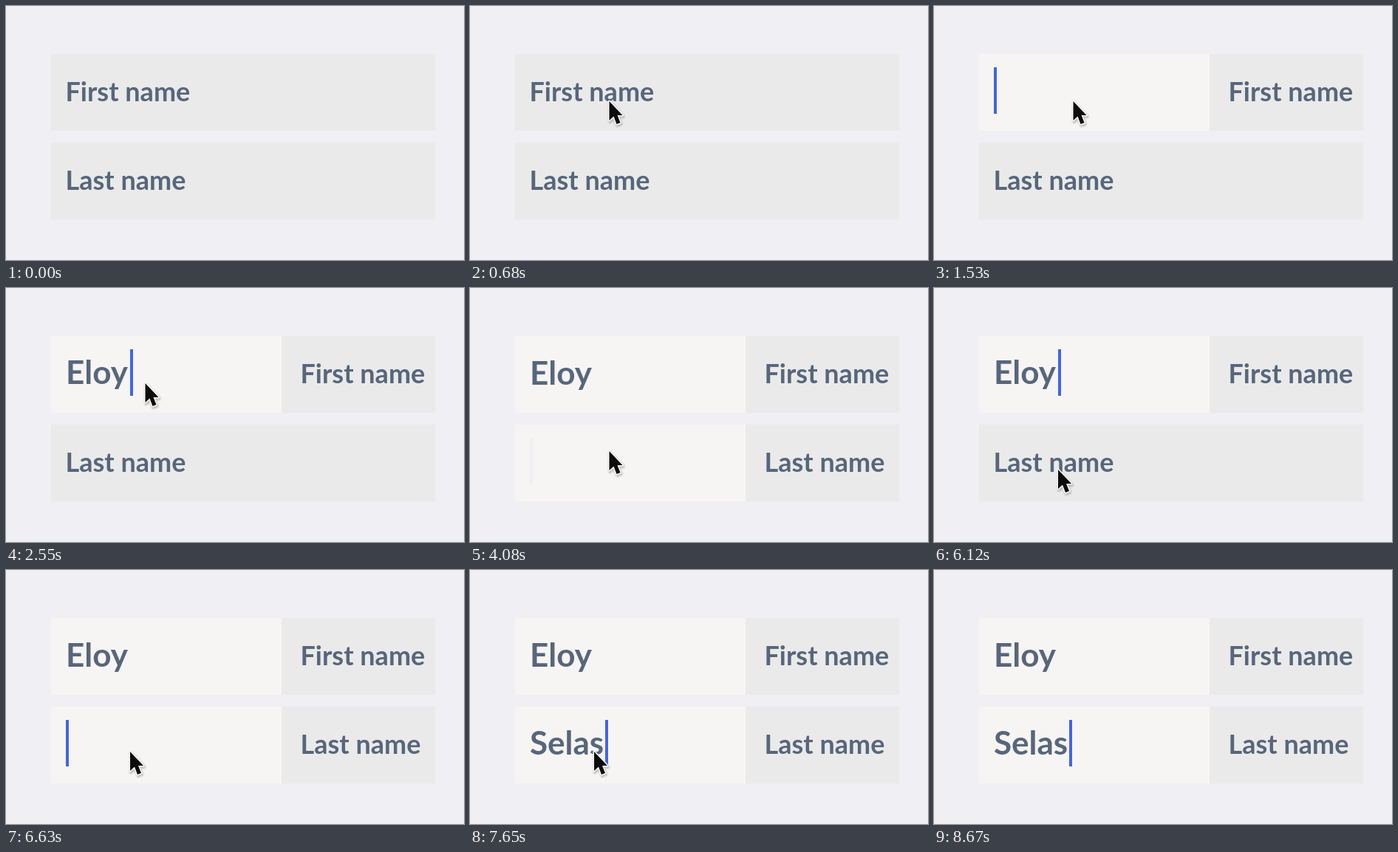
Animation of 620 by 344 pixels, one loop 8840 ms. Source, as an HTML page:

```html
<!DOCTYPE html>
<html lang="en">
<head>
<meta charset="utf-8">
<title>Sliding input labels</title>
<style>
html, body { margin: 0; width: 100%; height: 100%; overflow: hidden; background: #efeff4; }
svg { display: block; width: 100vw; height: 100vh; }
text { font-family: Lato, "Open Sans", sans-serif; font-weight: 700; fill: #57667b; white-space: pre; }
.label { font-size: 36px; }
.value { font-size: 44px; }
</style>
</head>
<body>
<svg viewBox="0 0 620 344">
  <defs>
    <clipPath id="box"><rect x="61" y="65" width="520" height="104"/></clipPath>
    <filter id="soft" x="-50%" y="-50%" width="200%" height="200%">
      <feGaussianBlur stdDeviation="1.3"/>
    </filter>
    <path id="arrow" d="M0 0V26L6 20.5L10 31L15 29L11 19H18Z" stroke-linejoin="round"/>
  </defs>
  <rect width="620" height="344" fill="#efeff4"/>
  <g id="fields"></g>
  <rect id="caret" width="4" height="63" fill="#4064ef"/>
  <g id="cursor">
    <use href="#arrow" x="1" y="2" fill="#888" stroke="#888" stroke-width="4" opacity=".5" filter="url(#soft)"/>
    <use href="#arrow" fill="#0c0c0c" stroke="#fafafa" stroke-width="3" paint-order="stroke"/>
  </g>
</svg>
<script>
const LOOP = 8840, STEP = 170;
const SLIDE = 400, BLINK = 1020, LIT = 590;
const TEXT_X = 81;
const $ = id => document.getElementById(id);

const fields = [
  { label: 'First name', value: 'Eloy', typeAt: 1870, gap: 226, caretEnd: 168 },
  { label: 'Last name', value: 'Selas', typeAt: 6950, gap: 175, caretEnd: 183 }
];

const focuses = [
  { at: 1120, field: 0 }, { at: 3485, field: 1 },
  { at: 4680, field: 0 }, { at: 6230, field: 1 }
];

const enter = { at: 170, x: 240, y: 254 }, leaveAt = 8330;
const moves = [
  { at: 170, ms: 510, x: 188.5, y: 129 },
  { at: 2890, ms: 340, x: 188.5, y: 221 },
  { at: 4250, ms: 340, x: 181, y: 124 },
  { at: 5440, ms: 340, x: 168, y: 246 },
  { at: 7820, ms: 340, x: 188, y: 272 }
];

fields.forEach((f, i) => {
  const g = document.createElementNS('http://www.w3.org/2000/svg', 'g');
  g.setAttribute('transform', `translate(0 ${120 * i})`);
  g.innerHTML = `<g clip-path="url(#box)">
    <rect x="61" y="65" width="520" height="104" fill="#f6f5f3"/>
    <text class="value" x="${TEXT_X}"></text>
    <rect class="panel" y="65" width="520" height="104" fill="#eaeaea"/>
    <text class="label" y="129">${f.label}</text></g>`;
  $('fields').append(g);
  for (const name of ['value', 'panel', 'label']) f[name + 'El'] = g.querySelector('.' + name);
});

const pen = document.createElement('canvas').getContext('2d');
pen.font = '700 44px Lato, "Open Sans", sans-serif';
const widthOf = s => pen.measureText(s).width;

const clamp = v => Math.max(0, Math.min(1, v));
const ease = p => p * p * (3 - 2 * p);
const progress = (t, at, ms) => ease(clamp((t - at) / ms));

function typedCount(f, t) {
  const n = Math.floor((t - f.typeAt) / f.gap) + 1;
  return Math.max(0, Math.min(f.value.length, n));
}

// A label stays aside while its field has focus or holds text.
function openness(f, t) {
  let open = 0;
  for (const { at, field } of focuses) {
    const goal = fields[field] === f || typedCount(f, at) > 0 ? 1 : 0;
    open += (goal - open) * progress(t, at, SLIDE);
  }
  return open;
}

function pointer(t) {
  let { x, y } = enter;
  for (const m of moves) {
    const p = progress(t, m.at, m.ms);
    x += (m.x - x) * p;
    y += (m.y - y) * p;
  }
  return [x, y];
}

// Focus and each key restart the blink.
function caretOpacity(f, focusAt, t) {
  const n = typedCount(f, t);
  const lastKey = n ? f.typeAt + (n - 1) * f.gap : 0;
  const age = t - Math.max(focusAt, lastKey);
  return age % BLINK < LIT ? 1 : .04;
}

function drawCaret(focus, t) {
  const caret = $('caret');
  caret.setAttribute('visibility', focus ? 'visible' : 'hidden');
  if (!focus) return;
  const f = fields[focus.field];
  const part = widthOf(f.value.slice(0, typedCount(f, t))) / widthOf(f.value);
  caret.setAttribute('x', TEXT_X + (f.caretEnd - TEXT_X) * part);
  caret.setAttribute('y', 83 + 120 * focus.field);
  caret.setAttribute('opacity', caretOpacity(f, focus.at, t));
}

function draw(time) {
  const t = Math.floor((time % LOOP) / STEP) * STEP;
  const focus = focuses.filter(e => e.at <= t).pop();

  fields.forEach((f, i) => {
    const open = openness(f, t);
    f.valueEl.textContent = f.value.slice(0, typedCount(f, t));
    f.valueEl.setAttribute('y', focus && focus.field === i ? 130 : 131);
    f.panelEl.setAttribute('x', 61 + 312 * open);
    f.labelEl.setAttribute('x', 80.5 + 318 * open);
  });

  drawCaret(focus, t);
  $('cursor').setAttribute('visibility', t >= enter.at && t < leaveAt ? 'visible' : 'hidden');
  $('cursor').setAttribute('transform', `translate(${pointer(t)})`);
}

const start = performance.now();
function tick() {
  draw(performance.now() - start);
  requestAnimationFrame(tick);
}
tick();
</script>
</body>
</html>
```
